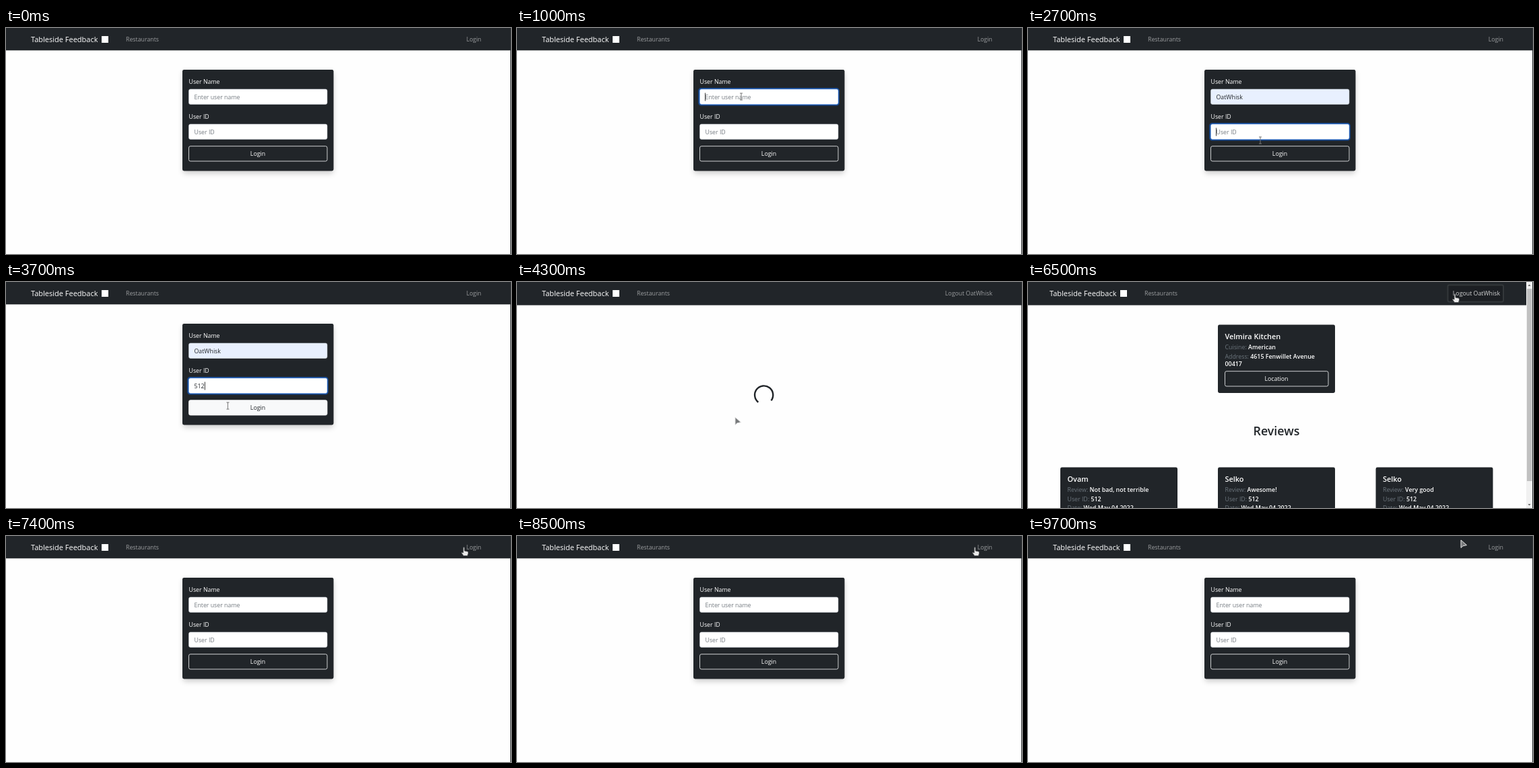
Animation of 750x336 px, one loop 9900 ms. Source, as an HTML page:

```html
<!DOCTYPE html>
<html lang="en">
<head>
<meta charset="utf-8">
<title>Login flow</title>
<style>
  html, body { margin: 0; width: 100%; height: 100%; overflow: hidden; background: #fefefe; }
  svg { display: block; width: 750px; height: 336px; }
  text { font: 8.8px "Open Sans", "Noto Sans", sans-serif; fill: #fff; white-space: pre; }
  .brand { font-size: 11px; }
  .nav { fill: #9b9d9f; }
  .hint { fill: #757b81; }
  .value { fill: #212529; }
  .muted { fill: #6c757d; }
  .strong { font-size: 8.9px; font-weight: 600; }
  .title { font-size: 10.9px; font-weight: 600; }
  .head { font-size: 17.8px; font-weight: 600; fill: #212529; }
</style>
</head>
<body>
<svg id="stage" viewBox="0 0 750 336">
  <defs>
    <filter id="soft" x="-10%" y="-10%" width="120%" height="130%"><feGaussianBlur stdDeviation="4"/></filter>
  </defs>
</svg>
<script>
const LOOP = 9900, STEP = 100;
const USER = "OatWhisk", DARK = "#212529";
const FOCUS_NAME = 900, FILL_NAME = 1800, FOCUS_ID = 2500;
const PRESS = 3700, LOADING = 4200, LOADED = 4400;
const HOVER = 5900, CLICK_OUT = 6400, LOGGED_OUT = 7400;
const TYPED = [[3200, "5"], [3300, "51"], [3500, "512"]];

// time, x, y, pointer shape
const PATH = [
  [700, 440, 60, "arrow"], [900, 333, 102, "beam"], [2300, 333, 102, "beam"],
  [2500, 345, 155, "beam"], [2700, 345, 167, "beam"], [3500, 345, 167, "beam"],
  [3800, 324, 190, "hand"], [4100, 324, 193, "hand"], [4200, 324, 201, "arrow"],
  [4900, 324, 201, "arrow"], [5900, 634, 18, "hand"], [6600, 634, 18, "hand"],
  [7300, 680, 17, "hand"], [8900, 680, 17, "hand"], [9000, 676, 14, "arrow"],
  [9500, 643, 6, "arrow"]
];

const text = (x, y, s, cls = "", more = "") => `<text x="${x}" y="${y}" class="${cls}" ${more}>${s}</text>`;
const rect = (x, y, w, h, fill, more = "") => `<rect x="${x}" y="${y}" width="${w}" height="${h}" fill="${fill}" ${more}/>`;
const group = (id, body) => `<g id="${id}">${body}</g>`;
const mid = 'text-anchor="middle"', end = 'text-anchor="end"';

const field = (id, y, label, hint) =>
  text(271.5, y - 8.5, label) +
  rect(270.5, y - .8, 207, 24, "none", `id="${id}Ring" rx="3" stroke="#0d6efd" stroke-opacity=".5" stroke-width="2.6"`) +
  rect(271.5, y, 205.5, 22.5, "#fff", `id="${id}Box" rx="2.4" stroke="#ced4da" stroke-width=".6"`) +
  text(279.5, y + 15, hint, "hint", `id="${id}Text"`) +
  rect(279, y + 5.5, .9, 12, "#222", `id="${id}Caret"`);

const pair = (x, y, key, value) =>
  `<text x="${x}" y="${y}" class="muted">${key}: <tspan class="strong" fill="#fff">${value}</tspan></text>`;

const card = (x, y, h, title) =>
  rect(x, y, 174, h, DARK, 'rx="2.4"') + text(x + 10.5, y + 21.5, title, "title");

const review = (x, name, words) =>
  card(x, 275.5, 80, name) +
  pair(x + 10.5, 312, "Review", words) +
  pair(x + 10.5, 326, "User ID", "512") +
  pair(x + 10.5, 339, "Date", "Wed May 04 2022");

const navbar =
  rect(0, 0, 750, 33.5, DARK, 'id="bar"') +
  group("links",
    text(37, 21, "Tableside Feedback", "brand") +
    rect(142, 12, 10, 10, "#fff") +
    text(178, 20, "Restaurants", "nav")) +
  rect(623.5, 4.5, 82.5, 25, "#1c1f23", 'id="outBox" rx="2.4" stroke="#424649" stroke-opacity=".6" stroke-width="2"') +
  text(706, 20, "Login", "nav", `id="account" ${end}`);

const loginPage =
  rect(263, 66, 223, 150, "#000", 'rx="3" opacity=".2" filter="url(#soft)"') +
  rect(262, 62, 224.5, 150.5, DARK, 'rx="2.4"') +
  field("name", 91, "User Name", "Enter user name") +
  field("id", 143, "User ID", "User ID") +
  rect(271.5, 175.7, 205.5, 22.3, "none", 'id="btn" rx="2.4" stroke="#f8f9fa" stroke-width=".8"') +
  text(374, 190.3, "Login", "", `id="btnText" ${mid}`);

const spinner =
  `<path id="arc" d="M9.6 9.6 A13.6 13.6 0 1 1 9.6 -9.6" fill="none" stroke="${DARK}" stroke-width="2.4"/>`;

const detailPage =
  card(282, 63.5, 101.5, "Velmira Kitchen") +
  pair(292.5, 100, "Cuisine", "American") +
  pair(292.5, 114, "Address", "4615 Fenwillet Avenue") +
  text(292.5, 125.3, "00417", "strong") +
  rect(292.5, 132.7, 153.5, 22.3, "none", 'rx="2.4" stroke="#f8f9fa" stroke-width=".8"') +
  text(369, 147.3, "Location", "", mid) +
  text(369, 227.5, "Reviews", "head", mid) +
  review(48, "Ovam", "Not bad, not terrible") +
  review(282, "Selko", "Awesome!") +
  review(516.5, "Selko", "Very good") +
  rect(740, 0, 9, 336, "#f1f1f1") +
  rect(741, 10, 7.5, 286, "#c1c1c1") +
  '<path d="M742.5 6 l2 -2.5 l2 2.5z M742.5 330 l2 2.5 l2 -2.5z" fill="#666"/>';

const pointer =
  '<path id="arrow" d="M0 0 V11.5 L3 8.8 L8.5 7.6 Z" fill="#77797b" stroke="#e4e4e4" stroke-width="1"/>' +
  '<path id="beam" d="M-2 -5 H2 M0 -5 V5 M-2 5 H2" fill="none" stroke="#777" stroke-width="1"/>' +
  '<path id="hand" d="M-1 0 Q0 -1 1 0 V5 L5.5 6 Q7 6.5 6.6 8.5 L5.5 12.5 H-.5 L-3.8 8 Q-3.5 6.5 -1 8 Z" fill="#e9e9e9" stroke="#3c3f42" stroke-width=".9"/>';

const stage = document.getElementById("stage");
stage.insertAdjacentHTML("beforeend",
  navbar + group("login", loginPage) + group("spin", spinner) + group("detail", detailPage) +
  rect(749, 0, 1, 336, "#303335") + group("cursor", pointer));

const $ = id => document.getElementById(id);
const show = (id, on) => $(id).setAttribute("display", on ? "inline" : "none");
const set = (id, key, value) => $(id).setAttribute(key, value);
const ease = p => p * p * (3 - 2 * p);

function drawField(id, value, hint, focus, since, t) {
  const label = $(id + "Text");
  label.textContent = value || hint;
  label.setAttribute("class", value ? "value" : "hint");
  show(id + "Ring", focus);
  set(id + "Box", "stroke", focus ? "#86b7fe" : "#ced4da");
  show(id + "Caret", focus && Math.floor((t - since) / 500) % 2 === 0);
  set(id + "Caret", "x", 279 + (value ? label.getComputedTextLength() + .8 : 0));
}

function drawLogin(t) {
  const first = t < LOADING;
  const name = first && t >= FILL_NAME ? USER : "";
  const typed = first ? TYPED.filter(k => k[0] <= t).pop() : null;
  drawField("name", name, "Enter user name", first && t >= FOCUS_NAME && t < FOCUS_ID, FOCUS_NAME, t);
  drawField("id", typed ? typed[1] : "", "User ID", first && t >= FOCUS_ID && t < 4000, FOCUS_ID, t);
  set("nameBox", "fill", name ? "#e8f0fe" : "#fff");
  const hot = first && t >= PRESS;
  set("btn", "fill", hot ? "#f8f9fa" : "none");
  $("btnText").style.fill = hot ? DARK : "#fff";
}

function drawNav(t, inside, detail) {
  const shift = detail ? -5 : 0;
  set("bar", "height", inside ? 34.5 : 33.3);
  set("links", "transform", `translate(${shift} 0)`);
  set("account", "x", 706 + shift);
  $("account").textContent = inside ? "Logout " + USER : "Login";
  $("account").style.fill = detail && t >= HOVER ? "#d3d4d5" : "#9b9d9f";
  show("outBox", detail && t >= CLICK_OUT);
}

function drawCursor(t) {
  const i = PATH.findLastIndex(k => k[0] <= t);
  show("cursor", i >= 0);
  if (i < 0) return;
  const a = PATH[i], b = PATH[i + 1] || a;
  const p = b === a ? 0 : ease((t - a[0]) / (b[0] - a[0]));
  set("cursor", "transform", `translate(${a[1] + (b[1] - a[1]) * p} ${a[2] + (b[2] - a[2]) * p})`);
  for (const s of ["arrow", "beam", "hand"]) show(s, s === a[3]);
}

function draw(now) {
  const t = Math.floor(now % LOOP / STEP) * STEP;
  const inside = t >= LOADING && t < LOGGED_OUT;
  const detail = inside && t >= LOADED;
  show("login", !inside);
  show("spin", inside && !detail);
  show("detail", detail);
  set("arc", "transform", `translate(366.7 168) rotate(${(t - 4127) * 360 / 750})`);
  drawLogin(t);
  drawNav(t, inside, detail);
  drawCursor(t);
}

const start = performance.now();
function tick() {
  draw(performance.now() - start);
  requestAnimationFrame(tick);
}
tick();
</script>
</body>
</html>
```
